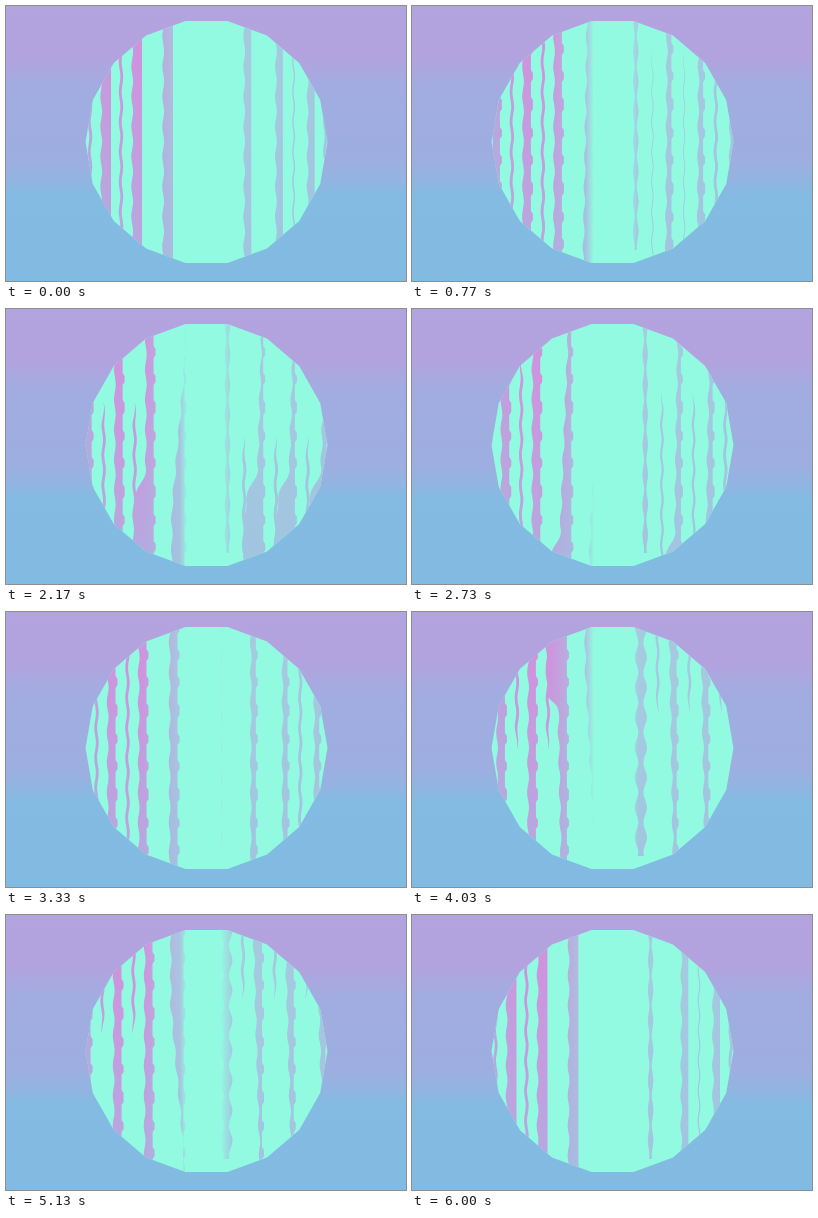
Recreate the animation shown at these times as an HTML page. Size 400 by 275 pixels, loop 6.03 s.

```html
<!DOCTYPE html>
<html lang="en">
<head>
<meta charset="utf-8">
<title>Striped sphere</title>
<style>
  html, body { margin: 0; width: 100%; height: 100%; overflow: hidden; }
  svg { display: block; width: 100%; height: 100%; }
</style>
</head>
<body>
<svg viewBox="0 0 400 275" preserveAspectRatio="none">
  <defs>
    <linearGradient id="sky" x2="0" y2="1">
      <stop offset="0" stop-color="#b3a3df"/>
      <stop offset=".19" stop-color="#b2a3df"/>
      <stop offset=".27" stop-color="#a5abe0"/>
      <stop offset=".35" stop-color="#a0ade1"/>
      <stop offset=".56" stop-color="#9eaee1"/>
      <stop offset=".63" stop-color="#93b4e1"/>
      <stop offset=".69" stop-color="#83bbe2"/>
      <stop offset="1" stop-color="#82bbe2"/>
    </linearGradient>
    <linearGradient id="tint" gradientUnits="userSpaceOnUse" x1="80" x2="320">
      <stop offset="0" stop-color="#b9a6dc"/>
      <stop offset=".1" stop-color="#cd95de"/>
      <stop offset=".24" stop-color="#ce94de"/>
      <stop offset=".31" stop-color="#bbabde"/>
      <stop offset=".38" stop-color="#abc3e0"/>
      <stop offset=".62" stop-color="#a5cbe0"/>
      <stop offset="1" stop-color="#a5c8e0"/>
    </linearGradient>
    <linearGradient id="cool" gradientUnits="userSpaceOnUse" x1="0" x2="0" y1="60" y2="255">
      <stop offset="0" stop-color="#9dbfe0" stop-opacity="0"/>
      <stop offset="1" stop-color="#9dbfe0" stop-opacity=".5"/>
    </linearGradient>
    <linearGradient id="fade" gradientUnits="userSpaceOnUse" x1="80" x2="320">
      <stop offset=".39" stop-color="#fff"/>
      <stop offset=".425" stop-color="#000"/>
      <stop offset=".56" stop-color="#000"/>
      <stop offset=".61" stop-color="#fff"/>
    </linearGradient>
    <mask id="sides" maskUnits="userSpaceOnUse" x="0" y="0" width="400" height="275">
      <rect width="400" height="275" fill="url(#fade)"/>
    </mask>
    <clipPath id="ball"><polygon class="disc"/></clipPath>
  </defs>
  <rect width="400" height="275" fill="url(#sky)"/>
  <polygon class="disc" fill="#93fae2"/>
  <g clip-path="url(#ball)">
    <g mask="url(#sides)">
      <path class="stripes" fill="url(#tint)"/>
      <path class="stripes" fill="url(#cool)"/>
    </g>
  </g>
</svg>
<script>
const LOOP = 6030, TURNS = 4, TOP = 10, BOTTOM = 262;

// time, drip top, drip bottom, lower flood, upper flood, lean
const KEYS = [
  [0, 0, 275, 300, -40, 0],
  [700, 0, 275, 300, -40, 0.1],
  [1530, 85, 275, 168, -40, 1],
  [2170, 92, 275, 168, -40, 1],
  [3330, 0, 275, 300, -40, 0],
  [4030, 0, 138, 300, 88, -0.6],
  [5130, 0, 120, 300, -40, -1],
  [6000, 0, 275, 300, -40, 0],
  [LOOP, 0, 275, 300, -40, 0]
];

const clamp = (v, lo = 0, hi = 1) => Math.min(hi, Math.max(lo, v));
const smooth = (a, b, v) => {
  const p = clamp((v - a) / (b - a));
  return p * p * (3 - 2 * p);
};
const wave = (y, phase = 0) => Math.sin((y - 98) * Math.PI * 2 / 30 + phase);

function stateAt(t) {
  const i = KEYS.findIndex(k => k[0] > t);
  const a = KEYS[i - 1], b = KEYS[i];
  const p = (t - a[0]) / (b[0] - a[0]);
  const [, top, bottom, low, high, lean] = a.map((v, j) => v + (b[j] - v) * p);
  return { top, bottom, low, high, lean };
}

// Closed outline of a vertical band whose edges depend on y.
function band(top, bottom, left, right) {
  const down = [], up = [];
  for (let y = top; y <= bottom; y += 3) {
    down.push(`${left(y).toFixed(1)} ${y.toFixed(1)}`);
    up.unshift(`${right(y).toFixed(1)} ${y.toFixed(1)}`);
  }
  return down.length ? `M${down.concat(up).join('L')}Z` : '';
}

function stripe(edge, s, phase, rightSide) {
  const lean = s.lean * (rightSide ? 0.45 : smooth(152, 164, edge));
  const base = rightSide ? 7 : 9.8;
  const floods = edge > 130 && edge < 165;
  const width = y => {
    let w = base * clamp(1 + lean * (y - 145) / 110, 0.15, 1.5);
    if (floods || rightSide) w += 11 * smooth(s.low - 10, s.low + 25, y);
    if (floods) w += 11 * smooth(s.high + 8, s.high - 6, y);
    return w;
  };
  const notch = phase > 0.15 && phase < 0.85 ? 2 : 0;
  return band(TOP, BOTTOM,
    y => edge - width(y) + 0.9 * wave(y),
    y => edge - ((y + 8) % 28 < 18 ? notch : 0));
}

function drip(edge, s, rightSide) {
  const inset = rightSide ? 35 : 0;
  const top = s.top && s.top + inset, bottom = s.bottom - (s.bottom < 200 ? inset : 0);
  const strength = rightSide
    ? Math.max(clamp(Math.abs(s.lean) * 1.5), smooth(302, 316, edge)) : 1;
  const half = y => 1.4 * strength * clamp((y - top) / 25) * clamp((bottom - y) / 25);
  const mid = y => edge - 21 + 0.8 * wave(y, 1);
  return band(Math.max(TOP, top), Math.min(BOTTOM, bottom),
    y => mid(y) - half(y), y => mid(y) + half(y));
}

function beads(edge, s) {
  const size = clamp(0.45 - s.lean, 0.45, 1);
  const half = y => size * (4.3 + 1.8 * wave(y));
  return band(TOP, 246, y => edge - 6 - half(y), y => edge - 6 + half(y));
}

function draw(now) {
  const t = now % LOOP, s = stateAt(t);
  const phase = t / LOOP * TURNS % 1;
  let d = '';
  for (let k = -1; k < 4; k++) {
    const edge = 74 + 31 * (k + phase);
    d += stripe(edge, s, phase, false);
    if (edge < 160) d += drip(edge, s, false);
  }
  d += beads(213.5 + 31.7 * phase, s);
  for (let k = 0; k < 4; k++) {
    const edge = 245.2 + 31.7 * (k + phase);
    d += stripe(edge, s, phase, true);
    d += drip(edge, s, true);
  }
  for (const path of paths) path.setAttribute('d', d);
  requestAnimationFrame(() => draw(performance.now() - start));
}

const corners = Array.from({ length: 18 }, (_, i) => {
  const a = i * Math.PI / 9;
  return `${(200.5 + 121 * Math.cos(a)).toFixed(1)},${(136 + 123 * Math.sin(a)).toFixed(1)}`;
}).join(' ');
document.querySelectorAll('.disc').forEach(p => p.setAttribute('points', corners));
const paths = document.querySelectorAll('.stripes');
const start = performance.now();
draw(0);
</script>
</body>
</html>
```
